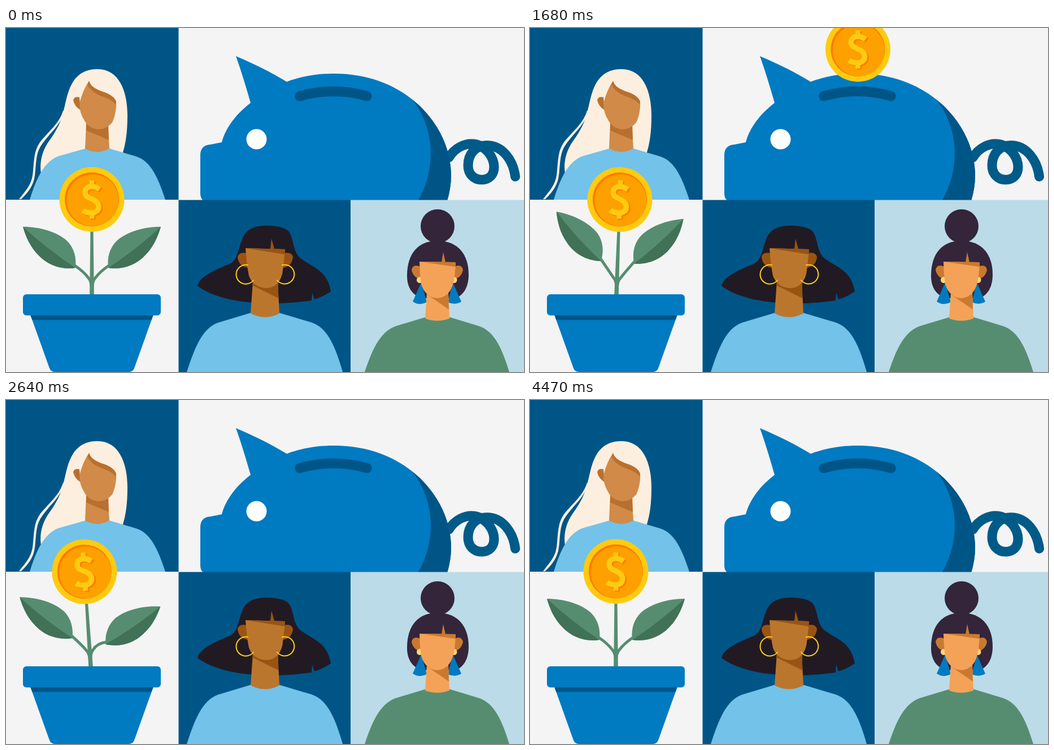
Recreate the animation shown at these times as an HTML page. Size 917 px wide and 611 px high, loop 4500 ms.

```html
<!DOCTYPE html>
<html lang="en">
<head>
<meta charset="utf-8">
<title>Savings garden</title>
<style>
  html, body { margin: 0; width: 100%; height: 100%; overflow: hidden; background: #f4f4f4; }
  svg { display: block; width: 100vw; height: 100vh; }
  .blue { fill: #007ac1; } .navy { fill: #005587; } .sky { fill: #72c2e9; }
  .green { fill: #568d70; } .moss { fill: #417156; }
  .line { fill: none; stroke-linecap: round; }
  .blonde { --skin: #d18a48; --shade: #b9702f; --hair: #fcefdf; }
  .dark { --skin: #bb762e; --shade: #9a5412; --hair: #211a23; }
  .bun { --skin: #f3a257; --shade: #c97a30; --hair: #34253a; }
  .skin { fill: var(--skin); } .shade { fill: var(--shade); } .hair { fill: var(--hair); }
</style>
</head>
<body>
<svg viewBox="0 0 917 611" preserveAspectRatio="none">
  <defs>
    <g id="dollar">
      <path class="line" stroke-width="9.5" style="stroke-linecap:butt" d="M13.5-18C8-22 3-23 0-23C-8-23-12-18-12-13C-12-5-5-3 1 0C8 3.5 12 6.5 12 13C12 20 6 24-1 24C-7 24-12 22.5-16 19.5"/>
      <path class="line" stroke-width="8.5" style="stroke-linecap:butt" d="M0-34V-22M0 23V34"/>
    </g>
    <g id="coin">
      <circle r="57.5" fill="#fecb0f"/>
      <circle r="48" fill="#ff7900"/>
      <circle cx="1.4" cy="1.4" r="46" fill="#fea000"/>
      <use href="#dollar" x="2.5" y="2" stroke="#ff7900"/>
      <use href="#dollar" stroke="#fecb0f"/>
    </g>
    <g id="leaf">
      <path class="green" d="M30 353C60 353 90 362 108 378C121 391 125 408 123 426C96 430 73 420 58 404C42 388 35 370 30 353Z"/>
      <path class="moss" d="M30 353Q73 393 123 426C96 430 73 420 58 404C42 388 35 370 30 353Z"/>
    </g>
    <clipPath id="slot"><path d="M500-150H660V130H639Q580 113 520 130H500Z"/></clipPath>
  </defs>

  <rect width="917" height="611" fill="#f4f4f4"/>
  <rect class="navy" width="305.5" height="305"/>

  <g class="blonde">
    <path class="hair" d="M62 258C59 238 64 218 76 201C90 182 98 165 102 147C109 122 112 73 162 73C200 73 215 112 215 155C215 185 212 205 206 224V260Z"/>
    <path class="hair" d="M101 147C94 170 76 183 60 203C48 220 50 240 47 262C44 280 34 290 23 304H27C39 292 49 280 51 262C54 240 52 222 64 206C80 184 97 172 104 147Z"/>
    <path class="sky" d="M42 305C55 262 70 235 95 227L141 214H183L230 228C255 236 268 262 282 305Z"/>
    <path class="skin" d="M142 168H180L183 214Q162 226 140 214Z"/>
    <path class="shade" d="M142 168H181L182 199L142 182Z"/>
    <path class="shade" d="M132 146Q121 139 119 128Q121 121 130 123Z"/>
    <path class="skin" d="M147 94C153 116 188 110 195 131C196 145 192 160 188 168Q178 180 163 180Q146 178 138 163Q130 150 130 134Q136 110 147 94Z"/>
    <path class="shade" d="M147 94C153 116 188 110 195 131L194 136C182 119 158 125 144 101Z"/>
  </g>

  <path class="line" stroke="#005b88" stroke-width="17" d="M784 230C795 212 814 204 828 206C850 209 864 230 864 247C864 261 855 269.5 842 269.5C827 269.5 818 258 818 244C818 223 832 208.5 851 208.5C879 208.5 898 235 901.5 264"/>
  <path class="blue" d="M344 294V226Q344 208 362 207L382 203C389 177 407 153 433 133C426 108 417 78 407 50C440 64 470 79 497 95.5C525 85 552 81 580 81C640 81 686 100 720 127.5C765 164 788 215 788 262Q788 284 781 307H350Q344 303 344 294Z"/>
  <path class="navy" d="M720 127.5C765 164 788 215 788 262Q788 284 781 307H729C745 280 752 250 752 222C752 190 741 155 720 127.5Z"/>
  <path class="line" stroke="#005587" stroke-width="17.5" d="M520 121Q580 104 639 121"/>
  <ellipse id="eye" cx="443.5" cy="197.5" rx="18" ry="18" fill="#fff"/>
  <g clip-path="url(#slot)"><use id="drop" href="#coin"/></g>

  <rect class="navy" x="305.5" y="305.5" width="304.5" height="305.5"/>
  <rect x="610" y="305.5" width="307" height="305.5" fill="#bbdbe8"/>

  <g class="dark">
    <path class="hair" d="M425 363Q437 351 460 351Q496 351 503 365C510 380 508 395 520 408C540 424 569 429 575 468Q560 478 546 482L542 470L541 484Q500 490 460 489C410 488 365 478 339 458C343 440 375 428 398 418C414 408 411 380 425 363Z"/>
    <path class="shade" d="M426 400Q412 397 410 407Q412 424 429 426ZM492 400Q506 397 508 407Q506 424 489 426Z"/>
    <path class="sky" d="M320 611C334 568 347 534 375 523.5L433 506H484L541 523C571 533 584 570 596 611Z"/>
    <path class="skin" d="M437 450H481L484 507Q459 520 433 507Z"/>
    <path class="shade" d="M437 450H482V480L436 457Z"/>
    <path class="skin" d="M424 391L494 393Q491 425 489 437Q482 462 460 462Q437 460 430 440Q426 420 424 391Z"/>
    <path class="shade" d="M424 391L494 393L493 402ZM470 374L468 392H475Z"/>
    <path class="line" stroke="#ffcf1a" stroke-width="2" d="M428 421A17 17 0 1 0 438 448M489 421A17 17 0 1 1 480 448"/>
  </g>

  <g class="bun">
    <circle class="hair" cx="764" cy="352" r="30"/>
    <path class="hair" d="M710 440C710 400 730 378 764 378C800 378 819 402 819 438C819 460 810 475 795 480H735C718 473 710 460 710 440Z"/>
    <path class="shade" d="M734 424Q720 418 718 430Q722 446 737 446ZM793 424Q807 418 809 430Q805 446 790 446Z"/>
    <path class="blue" d="M735 452L745 487Q732 494 720 486ZM791 452L806 486Q795 493 782 487Z"/>
    <circle cx="732.5" cy="447.5" r="5.5" fill="#fdd57c"/>
    <circle cx="793" cy="447.5" r="5.5" fill="#fdd57c"/>
    <path class="green" d="M635 611C648 573 661 540 690 529.5L743 513.5H785L836 529C866 538 879 573 891 611Z"/>
    <path class="skin" d="M745 470H783L785 516Q763 524 742 516Z"/>
    <path class="shade" d="M745 473H783L784 500Z"/>
    <path class="skin" d="M732 415L796 416Q795 440 792 452Q786 478 763 480Q742 478 735 455Q732 435 732 415Z"/>
    <path class="shade" d="M732 415L796 416L795 424ZM774 398L771 416H778Z"/>
  </g>

  <g id="plant">
    <path class="green" d="M149.5 355H154.5L156 490H148Z"/>
    <g id="left"><path class="line" stroke="#568d70" stroke-width="5"/><use href="#leaf"/></g>
    <g id="right" transform="matrix(-1 0 0 1 304 0)"><path class="line" stroke="#568d70" stroke-width="5"/><use href="#leaf"/></g>
    <use href="#coin" x="152" y="304.5"/>
  </g>
  <path class="blue" d="M43 509H261L227.5 603Q225 611 217 611H87Q79 611 76.5 603Z"/>
  <path class="navy" d="M43 509H261L257.6 518.5H46.4Z"/>
  <rect class="blue" x="30" y="473" width="244" height="37.5" rx="6"/>
</svg>
<script>
const LOOP = 4500, STEP = 30;
const $ = id => document.getElementById(id);

// Tables of [step, value]
const sway = [[0, 0], [35, 4.3], [97, -4.3], [132, 0], [150, 0]];
const liftLeft = [[0, 0], [13, 0], [21, .13], [42, .92], [54, 1.22], [66, 1], [88, .56],
  [100, .05], [110, -.2], [121, -.16], [140, 0], [150, 0]];
const liftRight = [[0, 0], [21, .72], [32, .95], [42, .92], [66, .74], [88, -1.1],
  [98, -1.4], [109, -1], [121, -.27], [136, 0], [150, 0]];
const blinks = [10, 99];

const clamp = x => Math.min(1, Math.max(0, x));
const smooth = p => p * p * (3 - 2 * p);

function segment(keys, s) {
  let i = 0;
  while (i < keys.length - 2 && s >= keys[i + 1][0]) i++;
  const span = keys[i + 1][0] - keys[i][0];
  return [i, span, clamp((s - keys[i][0]) / span)];
}

function ease(keys, s) {
  const [i, , p] = segment(keys, s);
  return keys[i][1] + (keys[i + 1][1] - keys[i][1]) * smooth(p);
}

function spline(keys, s) {
  const [i, span, p] = segment(keys, s);
  const slope = k => k < 1 || k > keys.length - 2 ? 0 :
    (keys[k + 1][1] - keys[k - 1][1]) / (keys[k + 1][0] - keys[k - 1][0]);
  const q = 1 - p;
  return keys[i][1] + (keys[i + 1][1] - keys[i][1]) * smooth(p) +
    span * p * q * (slope(i) * q - slope(i + 1) * p);
}

function poseLeaf(id, lift) {
  const [stalk, leaf] = $(id).children;
  const dy = -9 * lift;
  stalk.setAttribute("d", `M151.5 468Q152 450 146 444Q138 433 122 ${422 + dy}`);
  leaf.setAttribute("transform", `translate(0 ${dy}) rotate(${6.5 * lift} 123 424)`);
}

function draw(ms) {
  const s = ms % LOOP / STEP;
  $("plant").setAttribute("transform", `rotate(${ease(sway, s)} 152 503)`);
  poseLeaf("left", spline(liftLeft, s));
  poseLeaf("right", spline(liftRight, s));

  const enter = smooth(clamp((s - 22) / 27));
  const fall = clamp((s - 65) / 7) ** 2;
  const y = -60 + 98 * enter + 139 * fall;
  $("drop").setAttribute("transform", `translate(580.5 ${y}) rotate(${40 * (1 - enter)})`);
  $("drop").setAttribute("visibility", s > 22 && s < 73 ? "visible" : "hidden");

  const shut = Math.max(...blinks.map(b => 1 - clamp(Math.abs(s - b) / 4)));
  $("eye").setAttribute("ry", 18 * (1 - .95 * smooth(shut)));
}

let start;
function tick(now) {
  start ??= now;
  draw(now - start);
  requestAnimationFrame(tick);
}
draw(0);
requestAnimationFrame(tick);
</script>
</body>
</html>
```
